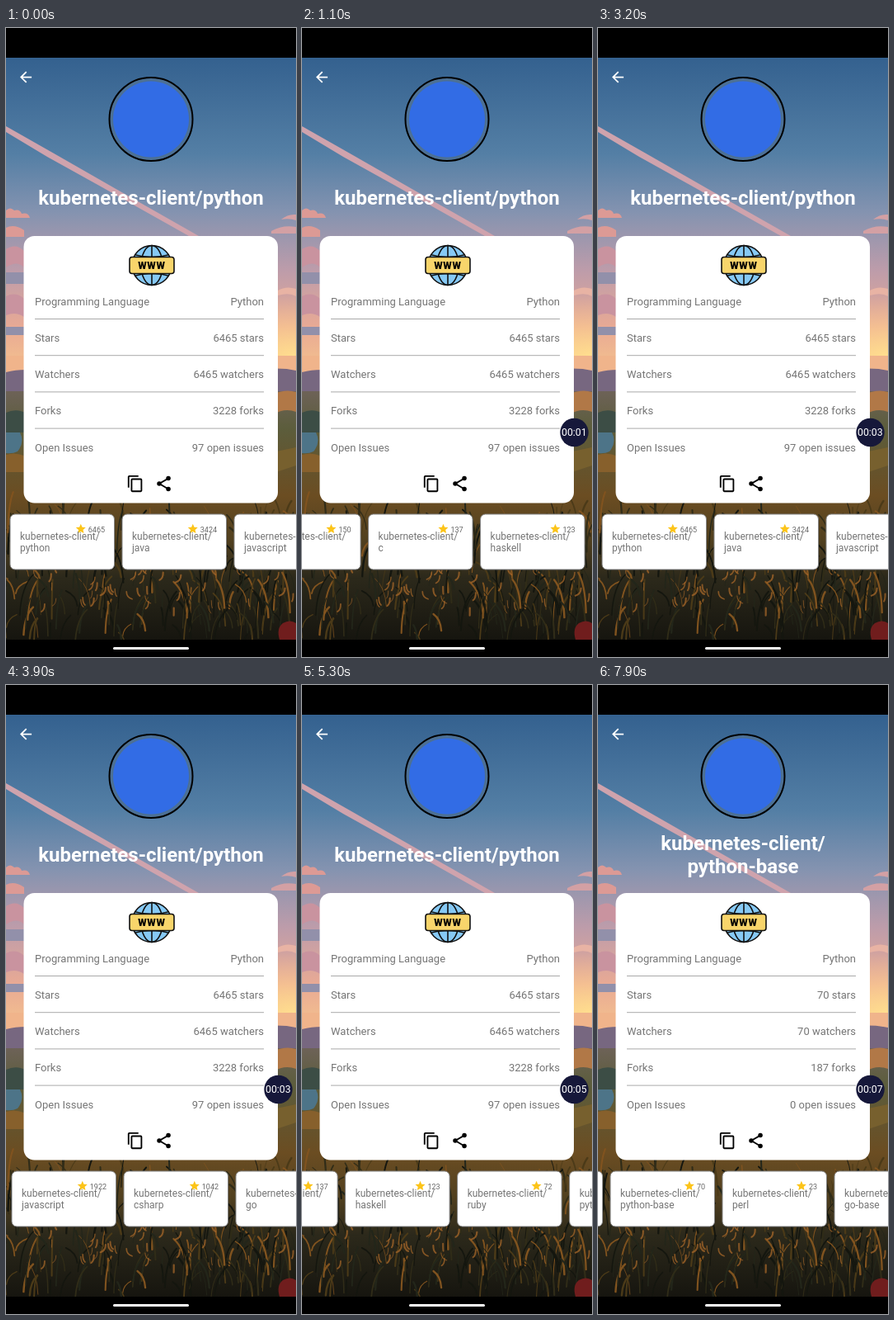
Animation, 352 px wide and 762 px high, one loop 8 s. Source, as an HTML page:

```html
<!DOCTYPE html>
<html lang="en">
<head>
<meta charset="utf-8">
<title>Repository details</title>
<style>
  html, body { margin: 0; width: 100%; height: 100%; overflow: hidden; background: #000; }
  svg { display: block; width: 352px; height: 762px; }
  text { font-family: Roboto, sans-serif; }
  #title { font-size: 24px; font-weight: 700; fill: #fff; text-anchor: middle; }
  #rows text { font-size: 13px; fill: #757575; }
  #cards text { font-size: 12px; fill: #757575; }
  #cards .stars { font-size: 9px; fill: #666; text-anchor: end; }
  .end { text-anchor: end; }
</style>
</head>
<body>
<svg viewBox="0 0 352 762">
  <defs>
    <linearGradient id="sky" x2="0" y2="1">
      <stop offset="0" stop-color="#34618f"/>
      <stop offset=".3" stop-color="#547fa5"/>
      <stop offset=".48" stop-color="#8493b0"/>
      <stop offset=".66" stop-color="#bd9caa"/>
      <stop offset=".84" stop-color="#e9aa94"/>
      <stop offset="1" stop-color="#f6c78c"/>
    </linearGradient>
    <linearGradient id="land" x2="0" y2="1">
      <stop offset="0" stop-color="#6d6257"/>
      <stop offset=".15" stop-color="#5c5d3c"/>
      <stop offset=".42" stop-color="#6b4d22"/>
      <stop offset=".6" stop-color="#51401f"/>
      <stop offset=".75" stop-color="#2c291b"/>
      <stop offset="1" stop-color="#16150f"/>
    </linearGradient>
    <radialGradient id="glow">
      <stop offset="0" stop-color="#ffdf8e"/>
      <stop offset="1" stop-color="#ffc890" stop-opacity="0"/>
    </radialGradient>
    <clipPath id="screen"><path d="M0 36H352V741H0z"/></clipPath>
    <clipPath id="globe"><circle cx="177" cy="287.500" r="24"/></clipPath>
  </defs>
  <rect width="352" height="762"/>

  <g clip-path="url(#screen)">
    <rect y="36" width="352" height="390" fill="url(#sky)"/>
    <ellipse cx="352" cy="398" rx="150" ry="75" fill="url(#glow)"/>
    <path d="M0 119L60 153 130 193 234 252 222 252 115 192 50 156 0 126z" fill="#cfa3ad"/>
    <path d="M0 221q5-5 10 0 7-2 9 4 8-2 10 5H0zM0 242q10-5 22 3v8H0z" fill="#dc9a95"/>
    <path d="M0 268q12-8 22 2v20q-9-9-22 0zM0 325q12-6 22 3v22q-10-7-22-2z" fill="#c9939f"/>
    <path d="M0 296h22v14H0zM0 362h22v10H0z" fill="#9290aa"/>
    <path d="M334 232q8-7 18-6v7q-8-3-18-1zM322 246q14-8 30-5v8h-30z" fill="#d3a0a4"/>
    <path d="M330 318q10-6 22-2v9q-8-5-22-1z" fill="#e8b3a4"/>
    <rect y="397" width="352" height="20" fill="#f0b48b"/>
    <path d="M0 417q22-6 55 0t110 0 120 1q40-9 67-3v38H0z" fill="#776780"/>
    <rect y="440" width="352" height="301" fill="url(#land)"/>
    <path d="M325 443q15-6 27-2v24q-14-5-27 3z" fill="#b17847"/>
    <path d="M0 466q13-6 25 1v23H0z" fill="#3c4d45"/>
    <path d="M0 490h17q6 12-3 23-6 3-14 2z" fill="#4d7488"/>
    <path d="M0 517q12-4 24 2v19H0z" fill="#87602c"/>
    <path d="M328 513l24-5v22l-24 8z" fill="#77602e"/>
    <g id="grass" fill="none" stroke-linecap="round"></g>
    <path d="M332 741q-4-14 4-20 9-5 16 0v20z" fill="#701d1d"/>
  </g>

  <rect x="130" y="750" width="92" height="3" rx="1.500" fill="#fff"/>
  <path transform="translate(13.500 49) scale(.88)" fill="#fff" d="M20 11H7.830l5.590-5.590L12 4l-8 8 8 8 1.410-1.410L7.830 13H20z"/>
  <circle cx="176" cy="110.500" r="50.500" fill="#4c7095" stroke="#000" stroke-width="2"/>
  <circle cx="176" cy="110.500" r="46" fill="#326ce5"/>
  <g id="title"></g>

  <rect x="21.500" y="252" width="308.500" height="323.500" rx="13" fill="#fff"/>
  <g stroke="#111" stroke-width="1.600" fill="none">
    <circle cx="177" cy="287.500" r="24" fill="#86c9f5"/>
    <path clip-path="url(#globe)" d="M177 263v49M153 274q24 7 48 0M153 301q24-7 48 0"/>
    <ellipse cx="177" cy="287.500" rx="13" ry="24"/>
    <rect x="150" y="277.500" width="54" height="20" rx="3" fill="#f8d56b"/>
  </g>
  <text x="177" y="292" text-anchor="middle" font-size="12" font-weight="900" letter-spacing=".8">WWW</text>
  <g id="rows"></g>
  <path transform="translate(146 541) scale(.92)" d="M16 1H4c-1.100 0-2 .9-2 2v14h2V3h12V1zm3 4H8c-1.100 0-2 .9-2 2v14c0 1.100.9 2 2 2h11c1.100 0 2-.9 2-2V7c0-1.100-.9-2-2-2zm0 16H8V7h11v14z"/>
  <g transform="translate(180.500 541) scale(.92)">
    <path d="M18 5L6 12l12 7" fill="none" stroke="#000" stroke-width="2"/>
    <circle cx="18" cy="5" r="3"/><circle cx="6" cy="12" r="3"/><circle cx="18" cy="19" r="3"/>
  </g>

  <g id="cards"></g>
  <g id="timer">
    <circle cx="330.500" cy="490" r="17.200" fill="#16183a"/>
    <text id="clock" x="330.300" y="494.300" font-size="12.300" fill="#fff" text-anchor="middle"></text>
  </g>
</svg>
<script>
const LOOP = 8000, TAP = 6800, PITCH = 136;
const $ = id => document.getElementById(id);

const repos = [
  ['python', 6465], ['java', 3424], ['javascript', 1922], ['csharp', 1042],
  ['go', 205], ['gen', 150], ['c', 137], ['haskell', 123],
  ['ruby', 72], ['python-base', 70], ['perl', 23], ['go-base', 18]
];
// Carousel swipes: [time, scroll offset]
const swipes = [
  [0, 0], [150, 0], [1100, 740], [1500, 850], [2100, 340], [2800, 0],
  [3200, 0], [4500, 611.5], [5300, 904], [6250, 1214], [LOOP, 1214]
];
const details = [
  { title: ['kubernetes-client/python'], stars: 6465, forks: 3228, issues: 97 },
  { title: ['kubernetes-client/', 'python-base'], stars: 70, forks: 187, issues: 0 }
];

// Smooth monotone interpolation through the swipe points
const slope = i => (swipes[i + 1][1] - swipes[i][1]) / (swipes[i + 1][0] - swipes[i][0]);
function tangent(i) {
  if (i === 0 || i === swipes.length - 1) return 0;
  const a = slope(i - 1), b = slope(i);
  return a * b > 0 ? 2 * a * b / (a + b) : 0;
}
function scrollAt(t) {
  let i = 0;
  while (i < swipes.length - 2 && t >= swipes[i + 1][0]) i++;
  const [t0, a] = swipes[i], [t1, b] = swipes[i + 1];
  const d = t1 - t0, u = (t - t0) / d, v = 1 - u;
  return v * v * (1 + 2 * u) * a + u * u * (3 - 2 * u) * b
    + d * u * v * (v * tangent(i) - u * tangent(i + 1));
}

function drawGrass() {
  let seed = 7;
  const rnd = () => (seed = seed * 16807 % 2147483647) / 2147483647;
  const colors = ['#14160f', '#23261a', '#302c18', '#4b3a18', '#80531f'];
  let out = '';
  for (let i = 0; i < 300; i++) {
    const x = rnd() * 352, y = 605 + rnd() * 145;
    const lean = (rnd() - .5) * 34, h = 14 + rnd() * 36;
    const color = colors[Math.floor(rnd() ** 1.4 * 5)];
    out += `<path d="M${x} ${y}q${lean * .1} ${-h * .7} ${lean} ${-h}" stroke="${color}" stroke-width="${.7 + rnd() * 1.8}"/>`;
  }
  for (let i = 0; i < 45; i++) {
    const x = rnd() * 352, y = 658 + rnd() * 55, dx = (rnd() - .5) * 14;
    out += `<path d="M${x} ${y}q${dx} -2 ${dx} -9" stroke="#a5672a" stroke-width="${.8 + rnd() * 1.5}" opacity=".75"/>`;
  }
  $('grass').innerHTML = out;
}

function starPath(cx, cy) {
  const points = Array.from({ length: 10 }, (_, i) => {
    const r = i % 2 ? 2.9 : 6.3, a = i * Math.PI / 5;
    return `${cx + r * Math.sin(a)},${cy - r * Math.cos(a)}`;
  });
  return `<polygon points="${points.join(' ')}" fill="#fcc419"/>`;
}

function drawCards() {
  $('cards').innerHTML = repos.map(([name, stars], i) => `
    <g transform="translate(${5 + i * PITCH} 589)">
      <rect x=".2" y="1" width="127" height="67" rx="6.500" fill="#000" opacity=".35"/>
      <rect width="126.500" height="67" rx="6" fill="#fff" stroke="#858585"/>
      ${starPath(106 - 5.05 * String(stars).length, 18)}
      <text class="stars" x="115" y="22">${stars}</text>
      <text x="12" y="31">kubernetes-client/</text>
      <text x="12" y="45">${name}</text>
    </g>`).join('');
}

function drawDetails({ title, stars, forks, issues }) {
  $('title').innerHTML = title.map((line, i) =>
    `<text x="176" y="${214 + 28 * i - 14 * (title.length - 1)}">${line}</text>`).join('');
  const rows = [
    ['Programming Language', 'Python'], ['Stars', stars + ' stars'],
    ['Watchers', stars + ' watchers'], ['Forks', forks + ' forks'],
    ['Open Issues', issues + ' open issues']
  ];
  $('rows').innerHTML = rows.map(([label, value], i) => {
    const y = 335.7 + 44.2 * i;
    const rule = i < 4 ? `<path d="M35 ${y + 16.8}H313" stroke="#a9a9a9"/>` : '';
    return `<text x="35" y="${y}">${label}</text><text class="end" x="313" y="${y}">${value}</text>${rule}`;
  }).join('');
}

let shown;
function frame(now) {
  const t = now % LOOP;
  const page = details[t < TAP ? 0 : 1];
  if (page !== shown) drawDetails(shown = page);
  $('cards').setAttribute('transform', `translate(${-scrollAt(t)} 0)`);
  $('timer').style.display = t < 100 ? 'none' : '';
  $('clock').textContent = '00:0' + Math.floor(t / 1000);
  requestAnimationFrame(frame);
}

drawGrass();
drawCards();
const start = performance.now();
const tick = () => frame(Math.max(0, performance.now() - start));
tick();
</script>
</body>
</html>
```
